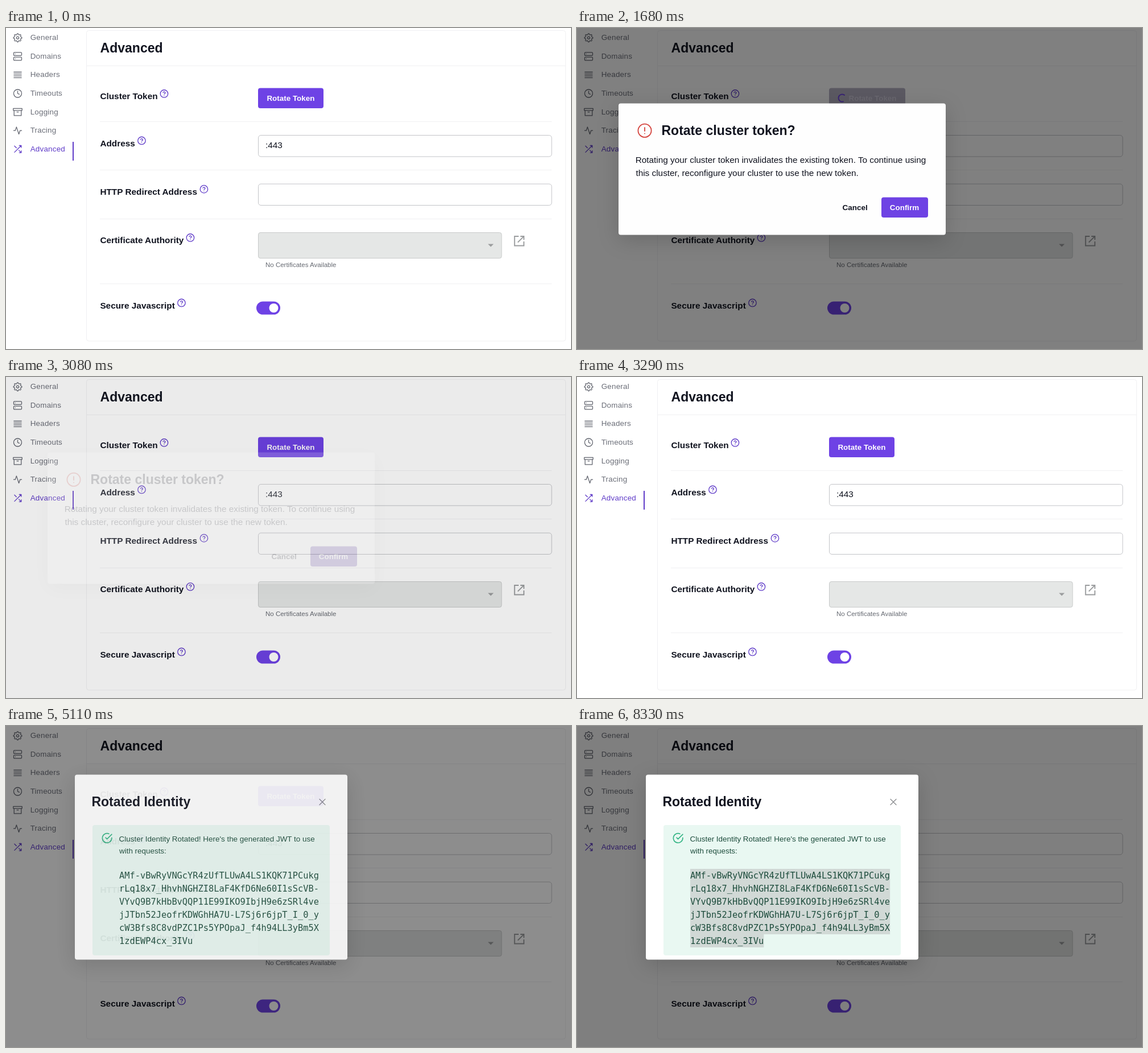
Write an HTML page that moves like this. It is 993x564 px and loops after 8400 ms.

```html
<!DOCTYPE html>
<html lang="en">
<head>
<meta charset="utf-8">
<title>Cluster settings</title>
<style>
  html, body { margin: 0; width: 100%; height: 100%; overflow: hidden; background: #fff; }
  svg { display: block; font: 13.43px "Liberation Sans", Arial, sans-serif; }
  .ln { fill: none; stroke-linecap: round; stroke-linejoin: round; }
  .nav { fill: #6b6e78; letter-spacing: .2px; }
  .nav .ln { stroke: #62656f; stroke-width: 1.8; }
  .nav .on { fill: #5f3bc8; }
  .nav .ln.on { fill: none; stroke: #5f3bc8; }
  .b { font-weight: 700; }
  .h { font-size: 23px; font-weight: 700; }
  .m { font-size: 15.35px; }
  .ink { fill: #10131f; }
  .w { fill: #fff; }
  .rule { stroke: #f0f0f2; fill: none; }
  .field { fill: #fff; stroke: #c3c4c8; }
  .help { stroke: #5f3bc8; stroke-width: 2; }
  .mono { font: 15.35px "DejaVu Sans Mono", monospace; }
  .paper { fill: #fff; filter: drop-shadow(0 9px 18px rgba(0, 0, 0, .16)); }
</style>
</head>
<body>
<svg width="993" height="564" viewBox="0 0 993 564">
  <g id="nav" class="nav"></g>
  <rect x="117" y="200" width="2" height="33" fill="#5f3bc8"/>

  <rect class="rule" x="141.5" y="4.5" width="842" height="545.5" rx="4"/>
  <path class="rule" d="M142 66.5H983M165 164.5H959M165 249.5H959M165 335.5H959M165 449.5H959"/>
  <text class="h ink" x="165.6" y="43.3">Advanced</text>
  <g id="rows" class="m b ink"></g>

  <rect id="ring" x="441.5" y="104" width="137" height="38.5" rx="5.5" fill="#c9bbf6"/>
  <rect id="btn" x="443" y="105.5" height="35.5" rx="4"/>
  <circle id="spin" class="ln" cx="466" cy="123" r="6.5" stroke="#6e42e5" stroke-width="2" stroke-dasharray="26 15"/>
  <text id="btnText" class="b" y="128">Rotate Token</text>

  <rect class="field" x="443.5" y="188.5" width="515.5" height="37.5" rx="4.5"/>
  <rect class="field" x="443.5" y="274" width="515.5" height="37.5" rx="4.5"/>
  <text class="m ink" x="456" y="211">:443</text>
  <rect x="443.5" y="359.5" width="427.5" height="45" rx="3.5" fill="#e5e7e6" stroke="#c8caca"/>
  <path d="M847 379.5h10l-5 5z" fill="#9b9d9e"/>
  <text x="456" y="420" font-size="11.51" fill="#666a72">No Certificates Available</text>
  <path d="M901 366h-7.2v16.5h16.4v-7.5M904 366h6.2v6.2M910 366.2l-10.5 10.5" fill="none" stroke="#9b9d9f" stroke-width="1.9"/>
  <rect x="440" y="480.5" width="42" height="23" rx="11.5" fill="#6e42e5"/>
  <circle class="w" cx="470.5" cy="492" r="8"/>

  <rect id="veil" width="993" height="564"/>

  <g id="ask">
    <rect class="paper" x="73" y="132.5" width="575" height="231" rx="4"/>
    <g class="ln" stroke="#d5443e" stroke-width="1.8">
      <circle cx="119" cy="180.3" r="11.6"/>
      <path d="M119 175v6M119 185.3v.1"/>
    </g>
    <text class="h ink" x="148.5" y="188.3">Rotate cluster token?</text>
    <text class="m ink" x="102.7" y="237">Rotating your cluster token invalidates the existing token. To continue using</text>
    <text class="m ink" x="103.4" y="260">this cluster, reconfigure your cluster to use the new token.</text>
    <text class="b ink" x="466.6" y="319.5">Cancel</text>
    <rect id="confirm" x="535" y="297.5" width="82" height="35.5" rx="4"/>
    <text class="b w" x="549.8" y="319.5">Confirm</text>
  </g>

  <g id="done">
    <rect class="paper" x="121" y="85.5" width="479" height="325" rx="4"/>
    <text class="h ink" x="150.4" y="141.3">Rotated Identity</text>
    <path class="ln" d="M551 128.5l10 10M561 128.5l-10 10" stroke="#8b8d90" stroke-width="1.3"/>
    <rect x="152" y="174" width="417" height="229" rx="4" fill="#e9f8f2"/>
    <path class="ln" d="M22 11.1V12a10 10 0 1 1-5.9-9.1M22 4 12 14l-3-3" transform="translate(167.6 187) scale(.83)" stroke="#35b585" stroke-width="2"/>
    <g fill="#1e4d3d">
      <text x="198.6" y="202.5">Cluster Identity Rotated! Here's the generated JWT to use</text>
      <text x="199" y="223.5">with requests:</text>
      <g id="token" class="mono"></g>
    </g>
  </g>
</svg>
<script>
const LOOP = 8400, STEP = 70, COLS = 38, CHAR = 9.241;
const ACCENT = [110, 66, 229], HOVER = [77, 45, 158], PRESSED = [65, 41, 120], DISABLED = [180, 176, 194];
const $ = id => document.getElementById(id);
const set = (el, attrs) => { for (const k in attrs) el.setAttribute(k, attrs[k]); };
const clamp = x => Math.max(0, Math.min(1, x));
const ramp = (t, from, to) => clamp((t - from) / (to - from));
const mix = (a, b, k) => `rgb(${a.map((v, i) => Math.round(v + (b[i] - v) * k))})`;

// cubic-bezier(.4, 0, .2, 1), solved by bisection
function ease(x) {
  let lo = 0, hi = 1;
  for (let i = 0; i < 20; i++) {
    const s = (lo + hi) / 2, r = 1 - s;
    if (1.2 * r * r * s + .6 * r * s * s + s * s * s < x) lo = s; else hi = s;
  }
  return lo * lo * (3 - 2 * lo);
}

function gear() {
  let d = '';
  for (let i = 0; i < 96; i++) {
    const a = i * Math.PI / 48, r = 9.3 + 1.3 * Math.tanh(2 * Math.cos(8 * a));
    d += `${i ? 'L' : 'M'}${(12 + r * Math.cos(a)).toFixed(2)} ${(12 + r * Math.sin(a)).toFixed(2)}`;
  }
  return d + 'zM15 12a3 3 0 1 1-6 0a3 3 0 1 1 6 0';
}

const menu = [
  ['General', gear()],
  ['Domains', 'M4 2h16q2 0 2 2v4q0 2-2 2H4q-2 0-2-2V4q0-2 2-2zM4 14h16q2 0 2 2v4q0 2-2 2H4q-2 0-2-2v-4q0-2 2-2zM6 6h.01M6 18h.01'],
  ['Headers', 'M2.5 5h19M2.5 9.7h19M2.5 14.3h19M2.5 19h19'],
  ['Timeouts', 'M22 12a10 10 0 1 1-20 0a10 10 0 1 1 20 0M12 6v6l4 2'],
  ['Logging', 'M21 8v13H3V8M1 3h22v5H1zM10 12h4'],
  ['Tracing', 'M22 12h-4l-3 9L9 3l-3 9H2'],
  ['Advanced', 'M16 3h5v5M4 20 21 3M21 16v5h-5M15 15l6 6M4 4l5 5']
];
$('nav').innerHTML = menu.map(([name, d], i) => {
  const y = 17.2 + i * 32.6, on = i == 6 ? 'on' : '';
  return `<path class="ln ${on}" d="${d}" transform="translate(12.1 ${y - 8.4}) scale(.7)"/>
    <text class="${on}" x="42.7" y="${y + 3.9}">${name}</text>`;
}).join('');

const rows = [
  ['Cluster Token', 125, 278], ['Address', 207.5, 238.5], ['HTTP Redirect Address', 292.7, 348],
  ['Certificate Authority', 378, 324], ['Secure Javascript', 492.5, 308.5]
];
$('rows').innerHTML = rows.map(([name, y, x]) =>
  `<text x="165.4" y="${y}">${name}</text>
  <path class="ln help" d="M22 12a10 10 0 1 1-20 0a10 10 0 1 1 20 0M9.1 9a3 3 0 0 1 5.8 1c0 2-3 3-3 3M12 17h.01"
    transform="translate(${x - 8.1} ${y - 17.6}) scale(.67)"/>`).join('');

const token = [
  'AMf-vBwRyVNGcYR4zUfTLUwA4LS1KQK71PCukg',
  'rLq18x7_HhvhNGHZI8LaF4KfD6Ne60I1sScVB-',
  'VYvQ9B7kHbBvQQP11E99IKO9IbjH9e6zSRl4ve',
  'jJTbn52JeofrKDWGhHA7U-L7Sj6r6jpT_I_0_y',
  'cW3Bfs8C8vdPZC1Ps5YPOpaJ_f4h94LL3yBm5X',
  '1zdEWP4cx_3IVu'
];
$('token').innerHTML = token.map((line, i) =>
  `<rect y="${251 + i * 23}" height="23"/><text x="199" y="${267.8 + i * 23.05}">${line}</text>`).join('');
const marks = [...$('token').querySelectorAll('rect')];

// index of the first selected character while dragging up from the end
function selectionStart(t) {
  if (t < 6230) return 204;
  if (t < 6300) return 190;
  if (t < 6440) return 152;
  return Math.round(152 * (1 - ramp(t, 6370, 6860)));
}

function buttonFill(t) {
  if (t < 1400) return mix(ACCENT, HOVER, t < 910 ? 0 : t < 1050 ? .3 : t < 1120 ? .7 : 1);
  if (t < 2940) return t < 1470 ? mix(HOVER, PRESSED, .6) : mix(PRESSED, DISABLED, ramp(t, 1540, 1680));
  return mix(ACCENT, ACCENT, 0);
}

function draw(t) {
  const busy = t >= 1400 && t < 2940, off = busy ? ramp(t, 1540, 1680) : 0;
  set($('btn'), { width: busy ? 134 : 115, fill: buttonFill(t) });
  set($('btnText'), { x: busy ? 477.5 : 458.4, fill: mix([255, 255, 255], [208, 204, 220], off) });
  set($('ring'), { opacity: busy ? 1 - off : 0 });
  set($('spin'), { opacity: off, transform: `rotate(${t * .257 % 360} 466 123)` });

  const ask = ease(ramp(t, 1474, 1699)) * (1 - ease(ramp(t, 2971, 3166)));
  const done = ease(ramp(t, 4969, 5194));
  set($('veil'), { opacity: (ask + done) / 2 });
  set($('ask'), { opacity: ask });
  set($('done'), { opacity: done });
  set($('confirm'), { fill: mix(ACCENT, HOVER, ramp(t, 2520, 2730)) });

  const start = selectionStart(t), tint = t < 8330 ? '#a9d4f9' : '#d1d9d6';
  marks.forEach((rect, i) => {
    const from = Math.max(0, start - i * COLS), count = Math.max(0, token[i].length - from);
    set(rect, { x: 199 + from * CHAR, width: count * CHAR, fill: tint });
  });
}

const begin = performance.now();
function tick() {
  const t = (performance.now() - begin) % LOOP;
  draw(Math.floor(t / STEP) * STEP);
  requestAnimationFrame(tick);
}
tick();
</script>
</body>
</html>
```
